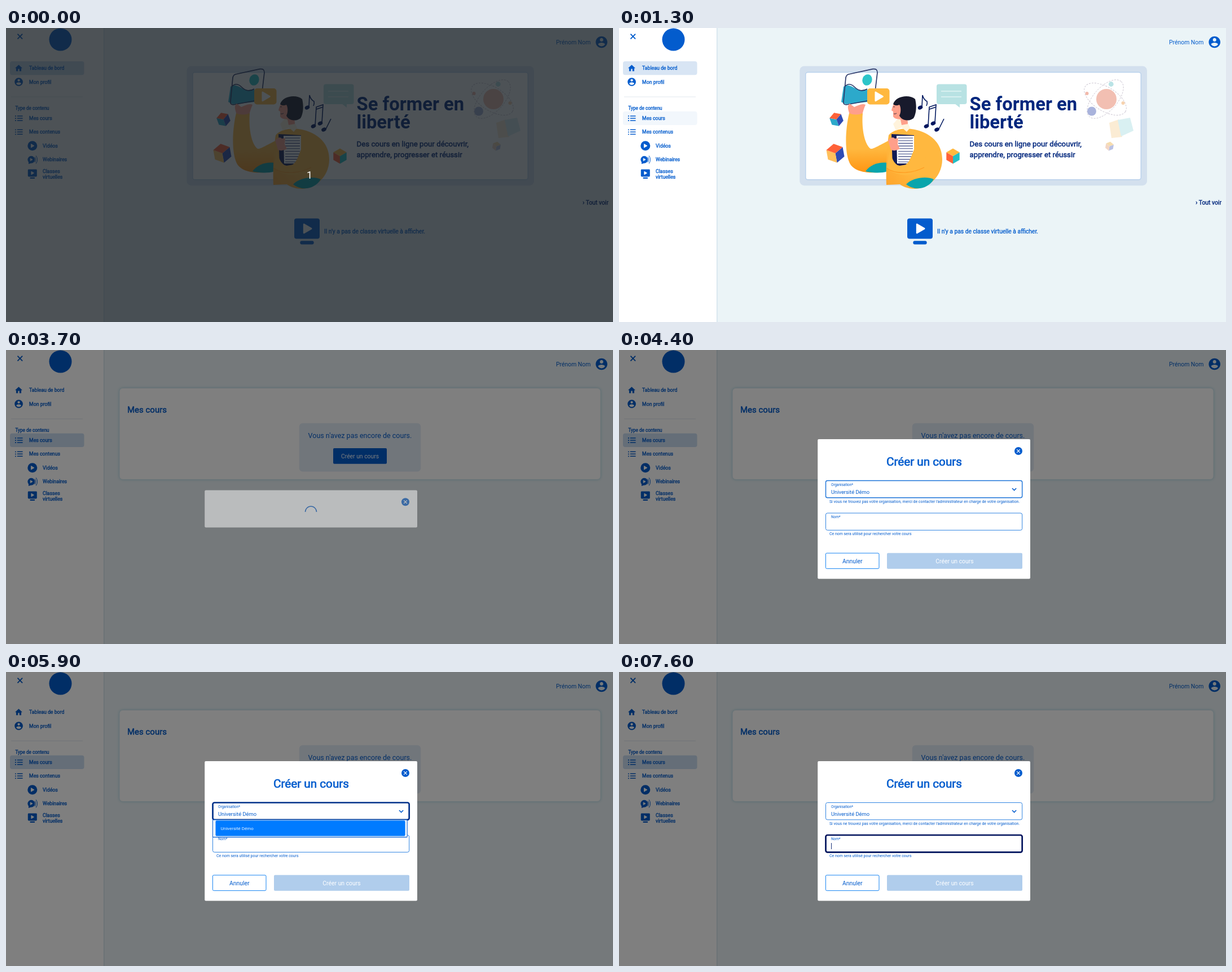
These frames come from a looping animation (1076 px wide and 521 px high, 8 s). An HTML page:

```html
<!DOCTYPE html>
<html lang="fr">
<head>
<meta charset="utf-8">
<title>Mes cours</title>
<style>
  html, body { margin: 0; width: 100%; height: 100%; overflow: hidden; background: #ebf4f7; }
  svg { display: block; width: 100%; height: 100%; font-family: Roboto, "Open Sans", sans-serif; }
  .card { filter: drop-shadow(0 0 2px #b4dbe6); }
</style>
</head>
<body>
<svg id="stage" viewBox="0 0 1076 521"></svg>
<script>
const LOOP = 8000;
const BLUE = '#035ccd', NAVY = '#00267d', YELLOW = '#ffb83f', TEAL = '#08a5ac', PINK = '#ff9f8a';
const FOCUS = [0, 18, 92], ACTIVE = [3, 92, 205], IDLE = [48, 132, 225];

const rect = (x, y, w, h, r, fill, extra = '') =>
  `<rect x="${x}" y="${y}" width="${w}" height="${h}" rx="${r}" fill="${fill}" ${extra}/>`;
const circle = (x, y, r, fill) => `<circle cx="${x}" cy="${y}" r="${r}" fill="${fill}"/>`;
const path = (d, fill, extra = '') => `<path d="${d}" fill="${fill}" ${extra}/>`;
const line = (d, color, width, extra = '') =>
  path(d, 'none', `stroke="${color}" stroke-width="${width}" ${extra}`);
const group = (id, content, extra = '') => `<g id="${id}" ${extra}>${content}</g>`;

// `heavy` thickens regular letters without changing their advance.
function text(x, y, size, content, { color = BLUE, heavy = 0, weight = 400, anchor = 'start' } = {}) {
  const stroke = heavy ? `stroke="${color}" stroke-width="${heavy}"` : '';
  return `<text x="${x}" y="${y}" font-size="${size}" font-weight="${weight}" fill="${color}"
    text-anchor="${anchor}" ${stroke}>${content}</text>`;
}

const play = (x, y, s, fill = '#fff') =>
  path(`M${x - s * .7} ${y - s}L${x + s} ${y}L${x - s * .7} ${y + s}Z`, fill,
    `stroke="${fill}" stroke-width="${s * .35}" stroke-linejoin="round"`);

const person = (x, y, r) => path('M12 2C6.48 2 2 6.48 2 12s4.48 10 10 10 10-4.48 10-10S17.52 2 12 2zm0 3c1.66 0 3 1.34 3 3s-1.34 3-3 3-3-1.34-3-3 1.34-3 3-3zm0 14.2c-2.5 0-4.71-1.28-6-3.22.03-1.99 4-3.08 6-3.08 1.99 0 5.97 1.09 6 3.08-1.29 1.94-3.5 3.22-6 3.22z',
  BLUE, `transform="translate(${x} ${y}) scale(${r / 10}) translate(-12 -12)"`);

const listIcon = y => [-4, 0, 4].map(d =>
  rect(16, y + d - .9, 1.8, 1.8, .5, BLUE) + rect(19.8, y + d - .8, 9.8, 1.6, .3, BLUE)).join('');

const monitor = (x, y, w) =>
  rect(x, y, w, w * .8, w * .09, BLUE) +
  play(x + w * .5, y + w * .4, w * .17) +
  rect(x + w * .23, y + w * .885, w * .54, w * .135, w * .065, BLUE);

// Three rhombs of a hexagon seen as a cube.
function cube(x, y, r, turn, colors) {
  const corner = i => {
    const a = (turn + i * 60) * Math.PI / 180;
    return `${(x + r * Math.cos(a)).toFixed(1)} ${(y + r * Math.sin(a)).toFixed(1)}`;
  };
  return colors.map((c, i) =>
    path(`M${x} ${y}L${corner(2 * i)}L${corner(2 * i + 1)}L${corner(2 * i + 2)}Z`, c)).join('');
}

const closeButton = y => circle(708, y, 7, BLUE) +
  line(`M705.2 ${y - 2.8}l5.6 5.6m0-5.6l-5.6 5.6`, '#fff', 1.2);

function sidebar() {
  const label = (x, y, content, size = 8.75) => text(x, y, size, content, { heavy: .35 });
  return rect(0, 0, 173.5, 521, 0, '#fff') + rect(173, 0, 1.4, 521, 0, '#d2e2ec') +
    rect(7, 59, 131.5, 24.3, 4, '#cbddf1', 'id="homeMark"') +
    rect(7, 147.8, 131.5, 24.3, 4, '#cbddf1', 'id="courseMark"') +
    line('M20.5 10.7l8.6 8.6m0-8.6l-8.6 8.6', BLUE, 1.9) +
    circle(96.5, 20.5, 20, BLUE) +
    path('M10 20v-6h4v6h5v-8h3L12 3 2 12h3v8z', BLUE, 'transform="translate(14.7 63.4) scale(.65)"') +
    label(41, 74.2, 'Tableau de bord') +
    person(22.6, 95.5, 7.3) + label(41, 98.6, 'Mon profil') +
    line('M9 122h127', '#e2e8ee', 1) +
    label(16.5, 144.8, 'Type de contenu', 8.2) +
    listIcon(160) + label(41, 163, 'Mes cours') +
    listIcon(184.3) + label(41, 187.4, 'Mes contenus') +
    circle(46.8, 208.7, 8.5, BLUE) + play(46.6, 208.7, 3) + label(65, 211.8, 'Vidéos') +
    circle(44.8, 233.2, 6.4, BLUE) + path('M40 236v5l6-2z', BLUE) + play(44.8, 233.2, 2.3) +
    line('M51.3 228.6q3 4.6 0 9.4M53.2 226.3q4.6 7 0 14', BLUE, 1) + label(65, 236, 'Webinaires') +
    monitor(38.8, 250.6, 16) + label(65, 256.9, 'Classes') + label(65, 267.2, 'virtuelles');
}

function figure() {
  const pages = Array.from({ length: 10 }, (_, i) => `M495 ${195 + i * 4.7}h26`).join('');
  return path('M394 131L398 104C406 97 415 106 424 109C432 112 437 107 441 110V131L402 135Z', '#2ca9cb') +
    `<ellipse cx="440" cy="92" rx="8.5" ry="10" fill="#2cc5c9" transform="rotate(20 440 92)"/>` +
    line('M407 82L450 72.7Q458 71.5 458 79L453 121Q452 127 446 128L403 136Q397 136 398 130L402 88Q403 83 407 82ZM400 104Q408 95 418 105T440 108', '#2a3768', 1.7) +
    path('M409 154C407 146 403 138 409 134L417 140C424 137 432 133 437 136C434 143 432 149 431 155Z', PINK) +
    path('M408 151C401 180 399 225 411 243C425 261 465 258 485 250L488 195C465 205 452 215 446 214C434 205 430 175 432 151Q420 156 408 151Z', 'url(#sleeve)') +
    path('M437 254C447 240 466 236 480 240V253C465 258 450 257 437 254Z', TEAL) +
    path('M478 190C490 175 520 177 535 183C560 192 573 210 573 233C573 262 550 284 525 285C510 285 502 280 498 277L474 278C473 262 474 215 478 190Z', 'url(#body)') +
    path('M486 170L494 161L509 162L516 177L510 184L501 176L491 182Z', '#fff3dc') +
    path('M491 128C485 137 484 142 483 146L486 148L486 157C489 162 495 161 499 162L501 172L512 170L510 135Z', PINK) +
    path('M486 135C490 120 515 117 525 126C528 138 527 152 522 160C513 167 500 163 497 155C500 150 500 140 497 136Q490 139 486 135Z', '#181a2c') +
    line('M486 140q2-1 3 0M487 152q3 1 5-1', '#23213a', .9) +
    path('M483 188L523 190V240L485 246Z', '#111b55') +
    path('M492 191L523 191V240H493Z', '#fff') + line(pages, '#39447f', 1.1) +
    path('M477 199Q485 191 489 196L495 195L494 206L498 214Q490 219 482 216Z', PINK) +
    path('M480 218C484 232 489 246 502 244C515 242 516 231 526 208C540 213 549 230 541 247C525 268 490 262 474 248Z', YELLOW) +
    line('M474 248C490 260 520 258 541 247', '#ff9d22', 1.4) +
    path('M509 277C520 265 545 262 558 268C548 285 525 290 509 277Z', TEAL) +
    rect(440, 107, 39.5, 28.5, 5, YELLOW) + play(460, 121.4, 7.5);
}

function notes() {
  return `<g fill="#00175f" stroke="#00175f" stroke-width="1.6">` +
    [[534, 141, -12], [545, 174, -12], [557, 169, -12], [563.5, 180, -12]].map(([x, y]) =>
      `<ellipse cx="${x}" cy="${y}" rx="3.7" ry="2.5" transform="rotate(-25 ${x} ${y})"/>`).join('') +
    path('M537 140L538 119Q540 127 546 130Q547 134 545 138M548 173L550 140L562 136L560 168M550 144L562 140M567 179L576 161', 'none') + '</g>';
}

function planets() {
  const orbit = turn => `<ellipse cx="862" cy="126" rx="42" ry="21" fill="none" stroke="#c9c3cf"
    stroke-width=".9" stroke-dasharray="3 2" transform="rotate(${turn} 862 126)"/>`;
  return orbit(-48) + orbit(32) + circle(864, 126, 18, '#f2bfb2') + circle(838, 147.5, 8, '#a9b3dc') +
    circle(872.3, 99.5, 4.4, '#b9e3e6') + circle(829.5, 116, 3, '#f2b9aa') + circle(893.5, 133, 3, '#f7d3af');
}

function dashboard() {
  const slogan = (y, content) => text(621.5, y, 13.27, content, { color: NAVY, heavy: .45 });
  const title = (y, content) => text(621.5, y, 32.8, content, { color: NAVY, weight: 700 });
  return rect(320.3, 67.5, 615.7, 211.7, 8, '#d3e0ee') +
    rect(330.8, 78.5, 594.5, 190.3, 4, '#fff', 'stroke="#b9d1ec" stroke-width="1.5"') +
    cube(385.5, 162, 12.5, 70, ['#2ca9cb', '#ff6138', '#2e4bb4']) +
    cube(383.5, 222, 17, -40, ['#2e4bb4', '#ffc05c', '#ff6138']) +
    cube(592, 227, 13.5, -30, ['#22bfc6', '#ff6138', '#ffb83f']) +
    figure() + notes() +
    rect(563, 99.5, 53.5, 35.5, 4, '#b8e2e3') + path('M595 134L604 141V134Z', '#b8e2e3') +
    line('M571 112h36M571 122h36', '#e3f5f5', 1.4) +
    planets() +
    path('M869 168L886 162L892 193L873 195Z', '#fbecd4') + path('M884 163L906 159L912 182L890 192Z', '#d9f0f2') +
    cube(869.5, 209.5, 8, -20, ['#b9c1e4', '#f3d6c5', '#f6dcae']) +
    title(146, 'Se former en') + title(178, 'liberté') +
    slogan(210.2, 'Des cours en ligne pour découvrir,') + slogan(229, 'apprendre, progresser et réussir') +
    text(1068, 313, 10.4, '› Tout voir', { color: NAVY, heavy: .4, anchor: 'end' }) +
    monitor(511, 337.5, 45) +
    text(564, 363.8, 10.3, "Il n'y a pas de classe virtuelle à afficher.", { heavy: .3 });
}

function courses() {
  return rect(201, 67.5, 853, 162, 6, '#fff', 'class="card" stroke="#d3e7ef" stroke-width="1"') +
    text(215, 110.5, 15, 'Mes cours', { heavy: .5 }) +
    rect(519.8, 129.8, 215.4, 85.7, 6, '#e4edf7') +
    text(627.5, 156, 12.5, "Vous n'avez pas encore de cours.", { anchor: 'middle' }) +
    rect(580, 174, 95, 27.8, 2, BLUE) +
    text(627.5, 191.6, 10.35, 'Créer un cours', { color: '#fff', anchor: 'middle' });
}

function form() {
  const field = (id, y, label) =>
    rect(366.5, y, 348.2, 30.3, 3, '#fff', `id="${id}"`) + text(376, y + 9.2, 6.4, label);
  return rect(352.2, 158, 376.8, 247.5, 2, '#fff') + closeButton(179) +
    text(541, 205.2, 20.7, 'Créer un cours', { heavy: .7, anchor: 'middle' }) +
    field('org', 231.5, 'Organisation*') + text(376, 254.7, 9.33, 'Université Démo') +
    line('M697 245l3.6 3.6l3.6-3.6', BLUE, 1.5) +
    text(373, 270.8, 6.95, "Si vous ne trouvez pas votre organisation, merci de contacter l'administrateur en charge de votre organisation.") +
    field('name', 289, 'Nom*') + rect(376, 303, .9, 11, 0, '#001a6b', 'id="caret"') +
    text(373, 328, 6.95, 'Ce nom sera utilisé pour rechercher votre cours') +
    rect(366.4, 360, 94.6, 27.4, 2, '#fff', 'stroke="#1683f2" stroke-width="1"') +
    text(413.8, 377.5, 10.4, 'Annuler', { anchor: 'middle' }) +
    rect(475, 359.7, 240, 28, 2, '#b0cdec') +
    text(595, 377.5, 10.4, 'Créer un cours', { color: '#fff', anchor: 'middle' }) +
    group('drop', rect(0, 0, 349, 31, 1, '#fff', `stroke="${BLUE}" stroke-width="1.1"`) +
      rect(5, 1.2, 340.5, 27.8, 2, '#007bff') +
      text(14.2, 18, 8.13, 'Université Démo', { color: '#e8f3ff' }));
}

const loader = rect(352.2, 248.5, 376.8, 66, 2, '#fff') + closeButton(269.2) +
  line('M530.5 287a10 10 0 0 1 20 0', BLUE, 1.5);

document.getElementById('stage').innerHTML =
  `<defs>
    <linearGradient id="sleeve" x1="0" y1="0" x2="0" y2="1"><stop offset=".6" stop-color="${YELLOW}"/><stop offset="1" stop-color="#ff9412"/></linearGradient>
    <linearGradient id="body" x1="1" y1="0" x2="0" y2="1"><stop offset=".6" stop-color="${YELLOW}"/><stop offset="1" stop-color="#ffa32a"/></linearGradient>
  </defs>` +
  rect(0, 0, 1076, 521, 0, '#ebf4f7') + sidebar() +
  text(975, 28.5, 10.4, 'Prénom Nom') + person(1055.7, 25, 10.3) +
  group('dashboard', dashboard()) + group('courses', courses()) +
  rect(0, 0, 1076, 521, 0, '#000', 'id="dim" opacity=".5"') +
  group('loader', loader, 'opacity=".5"') + group('form', form()) +
  group('countdown', rect(0, 0, 1076, 521, 0, '#161c22', 'opacity=".76"') +
    text(538, 266.5, 18, '1', { color: '#fff', anchor: 'middle' }));

const $ = id => document.getElementById(id);
const show = (id, on) => $(id).setAttribute('display', on ? 'inline' : 'none');
const ramp = (t, from, to) => Math.min(1, Math.max(0, (t - from) / (to - from)));
const easeOut = p => 1 - (1 - p) ** 2;
const mix = (a, b, p) => a.map((v, i) => v + (b[i] - v) * p);

function outline(id, hover, grow, focus) {
  const color = mix(mix(IDLE, ACTIVE, hover), FOCUS, focus).map(Math.round);
  $(id).setAttribute('stroke', `rgb(${color})`);
  $(id).setAttribute('stroke-width', 1 + hover + .7 * grow);
}

function draw(time) {
  const t = Math.floor(time / 100) * 100;
  show('countdown', t < 100);
  show('dashboard', t < 1400);
  show('courses', t >= 1400);
  const moved = ramp(t, 1200, 1600);
  $('homeMark').setAttribute('opacity', 1 - moved);
  $('courseMark').setAttribute('opacity', moved);

  show('dim', t >= 3700);
  show('loader', t === 3700);
  show('form', t >= 3800);
  $('form').setAttribute('opacity', t < 3900 ? .9 : 1);

  const left = 1 - ramp(t, 7300, 7600);
  outline('org', easeOut(ramp(t, 4300, 4700)) * left, ramp(t, 4800, 5000) * left, ramp(t, 5600, 6100) * left);
  const typed = ramp(t, 7300, 7600);
  outline('name', easeOut(ramp(t, 6900, 7200)), typed, typed);
  show('caret', t >= 7500);

  const opened = ramp(t, 5600, 6000);
  show('drop', t >= 5700 && t < 6500);
  $('drop').setAttribute('opacity', Math.min(1, .5 + opened) * (1 - ramp(t, 6300, 6500)));
  $('drop').setAttribute('transform', `translate(366.5 262) scale(${1 - .2 * (1 - opened) ** 2})`);
}

const start = performance.now();
function tick() {
  draw((performance.now() - start) % LOOP);
  requestAnimationFrame(tick);
}
tick();
</script>
</body>
</html>
```
